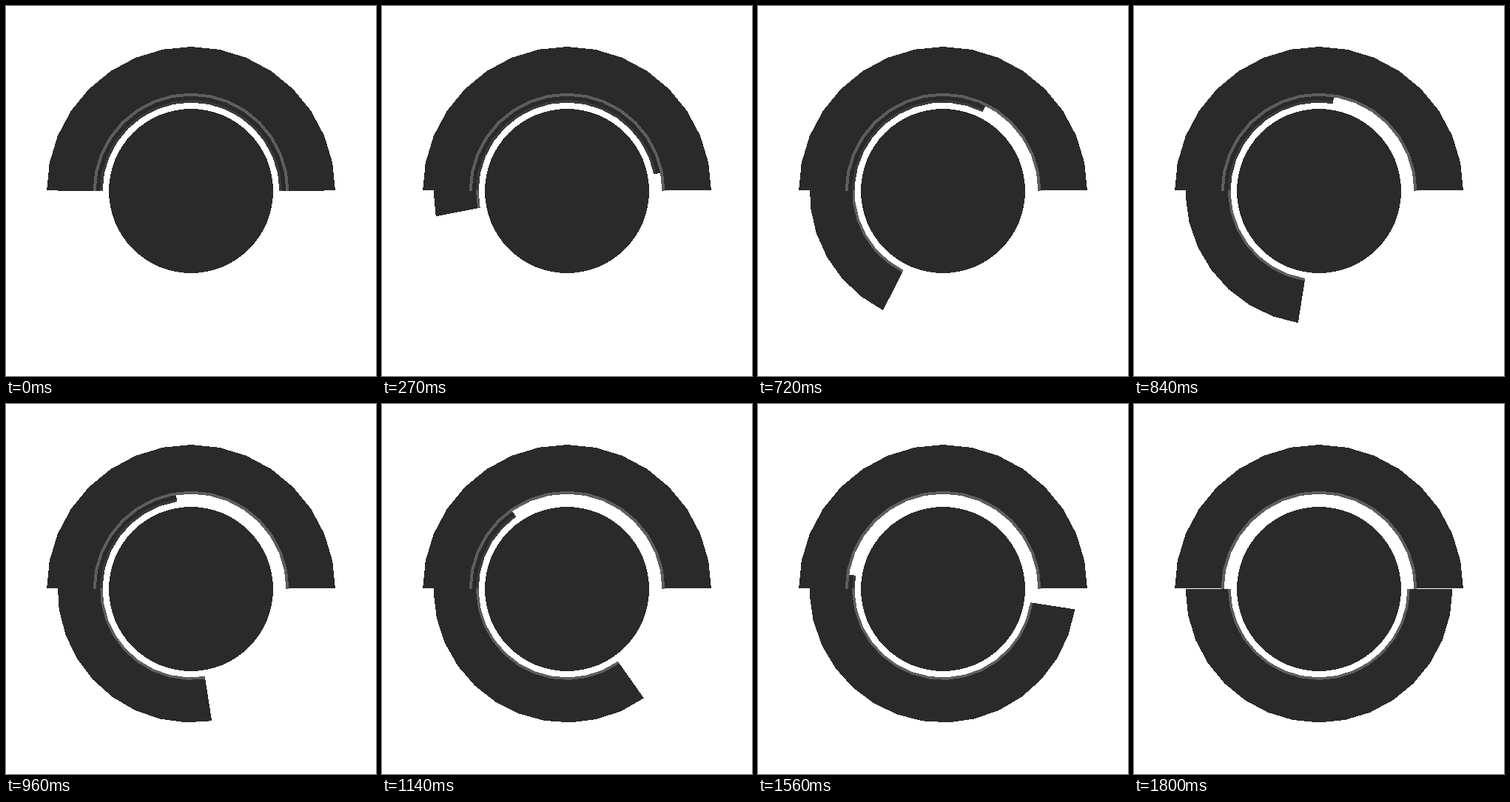
An HTML page for the animation above (1830 ms loop, 500 by 500 pixels).

```html
<!DOCTYPE html>
<html lang="en">
<head>
<meta charset="utf-8">
<title>Turning ring</title>
<style>
  html, body { margin: 0; width: 100%; height: 100%; overflow: hidden; background: #fff; }
  svg { display: block; width: 100vw; height: 100vh; shape-rendering: crispEdges; }
  .dark { fill: #2a2a2a; }
  .light { fill: #5e5e5e; }
  .dim { fill: #3a3a3a; }
</style>
</head>
<body>
<svg viewBox="0 0 500 500">
  <defs>
    <clipPath id="above"><rect width="500" height="249"/></clipPath>
    <clipPath id="below"><rect y="249" width="500" height="251"/></clipPath>
  </defs>
  <path class="dark turn" data-ring="180.5 122"/>
  <g clip-path="url(#above)"><path class="dim turn" data-ring="123 119.5"/></g>
  <g clip-path="url(#below)"><path class="light turn" data-ring="123 119.5"/></g>
  <g clip-path="url(#above)"><path class="dark" data-ring="195 131"/></g>
  <path class="light" data-ring="132.5 128.5"/>
  <circle class="dark" cx="250" cy="250" r="111"/>
</svg>
<script>
  const STEP = 30, LOOP = 1830, LAST = 60, SEGMENTS = 16, CENTER = 250;

  // Faceted upper half ring
  function halfRing(outer, inner) {
    const points = [];
    const add = (r, i) => {
      const a = Math.PI * i / SEGMENTS;
      points.push((CENTER - r * Math.cos(a)).toFixed(2) + ' ' + (CENTER - r * Math.sin(a)).toFixed(2));
    };
    for (let i = 0; i <= SEGMENTS; i++) add(outer, i);
    for (let i = SEGMENTS; i >= 0; i--) add(inner, i);
    return 'M' + points.join('L') + 'Z';
  }

  for (const path of document.querySelectorAll('[data-ring]')) {
    path.setAttribute('d', halfRing(...path.dataset.ring.split(' ').map(Number)));
  }

  const turning = document.querySelectorAll('.turn');
  const start = performance.now();

  function draw() {
    const time = Math.max(0, performance.now() - start) % LOOP;
    const t = Math.floor(time / STEP) / LAST;
    const angle = 180 * t * t * (3 - 2 * t);
    for (const path of turning) path.setAttribute('transform', `rotate(${-angle} ${CENTER} ${CENTER})`);
    requestAnimationFrame(draw);
  }
  draw();
</script>
</body>
</html>
```
